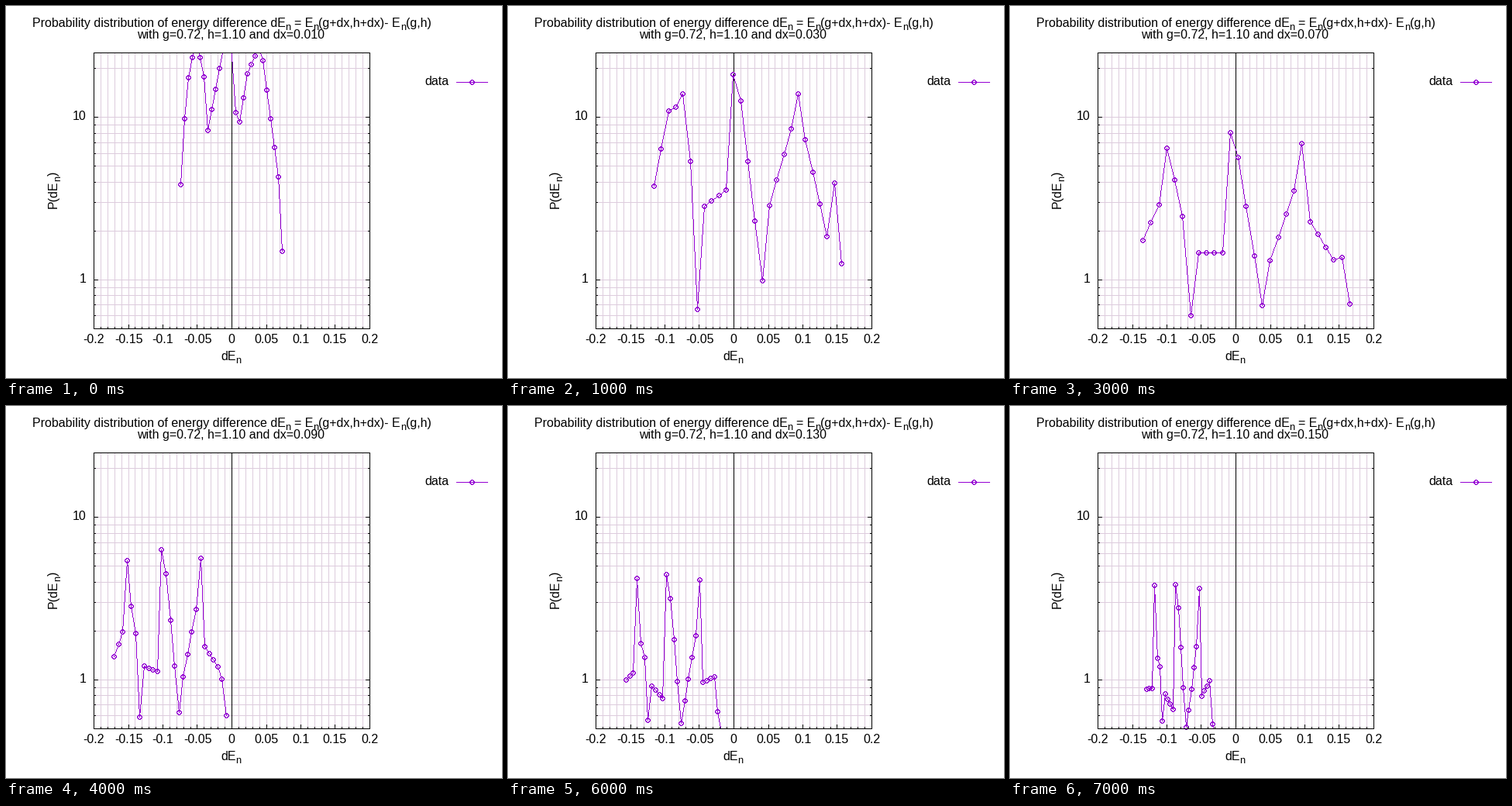
Animation of 640 by 480 pixels, one loop 8000 ms. Source, as a matplotlib script:

```python
import numpy as np
import matplotlib.pyplot as plt
from matplotlib.animation import FuncAnimation
from matplotlib.collections import PolyCollection

W, H, DPI = 640, 480, 100
PX = 72 / DPI                        # one pixel in points
L, R, T, B = 113, 469, 60, 416       # plot box
PURPLE, GRID = "#9400d3", "#ddccdd"
DECADE = (B - T) / np.log10(50)
STEPS, BINS = 8, np.arange(27)

# First and last bin of each step, in pixels
SPANS = [(225, 356), (188, 430), (165, 395), (171, 438),
         (139, 284), (102, 286), (152, 275), (176, 264)]

# Key points of the narrow opening curve: bin, pixel row
OPENING = [(0, 230), (1, 145), (2, 92), (4, 40), (6, 91), (7, 160), (10, 80),
           (12, 30), (13, 50), (14, 137), (15, 149), (17, 87), (20, 52),
           (21, 70), (25, 220), (26, 316)]

# Key points of the three-peaked curve: bin, row at dx=0.05, row at dx=0.15
PEAKS = [(0, 274, 365), (2, 208, 364), (3, 162, 231), (4, 180, 325),
         (5, 243, 336), (6, 396, 406), (7, 294, 371), (10, 286, 391),
         (11, 133, 230), (12, 166, 260), (15, 373, 414), (16, 300, 392),
         (19, 206, 310), (20, 152, 235), (21, 236, 374), (24, 315, 354),
         (25, 286, 410), (26, 363, 430)]

plt.rcParams["font.family"] = "Liberation Sans"

fig = plt.figure(figsize=(W / DPI, H / DPI), dpi=DPI, facecolor="white")
ax = fig.add_axes([0, 0, 1, 1])
ax.set_xlim(-0.1, W - 0.1)           # keeps snapped lines on whole pixels
ax.set_ylim(H - 0.1, -0.1)
ax.axis("off")


def px(v):
    return round(L + (v + 0.2) / 0.4 * (R - L))


def py(p):
    return round(B - DECADE * np.log10(p / 0.5))


def line(xs, ys, color="black", z=1, **kw):
    ax.plot(xs, ys, color=color, lw=PX, antialiased=False, zorder=z, **kw)


def text(x, y, s, size=16, **kw):
    return ax.text(x, y, s, fontsize=size * PX, va="baseline",
                   color="black", zorder=6, **kw)


def sub(x, y, **kw):
    text(x, y, "n", 12.8, **kw)


def pixel_layer():
    layer = PolyCollection([], facecolor=PURPLE, edgecolor="none",
                           linewidth=0, antialiased=False, zorder=3)
    layer.set_snap(False)
    return ax.add_collection(layer, autolim=False)


def squares(pts):
    corners = np.array([(0, 0), (1, 0), (1, 1), (0, 1)]) * 0.96 - 0.08
    return np.unique(pts, axis=0)[:, None, :] + corners


def trace(x, y):
    """Hard-edged one-pixel path through the points."""
    parts = []
    for x0, y0, x1, y1 in zip(x, y, x[1:], y[1:]):
        n = int(max(abs(x1 - x0), abs(y1 - y0))) + 1
        parts.append(np.column_stack([np.linspace(x0, x1, n),
                                      np.linspace(y0, y1, n)]))
    return np.round(np.vstack(parts))


def rings(x, y):
    a = np.linspace(0, 2 * np.pi, 72, endpoint=False)
    ring = np.round(2.7 * np.column_stack([np.cos(a), np.sin(a)]))
    return (np.column_stack([x, y])[:, None, :] + ring).reshape(-1, 2)


def inside(pts):
    x, y = pts[:, 0], pts[:, 1]
    return (x >= L) & (x <= R) & (y >= T) & (y <= B)


def rows(i, dx):
    if i == 0:
        k, r = np.transpose(OPENING)
    else:
        k, start, end = np.transpose(PEAKS)
        r = start + (end - start) * np.log(dx / 0.05) / np.log(3)
    return np.interp(BINS, k, r)


# Grid and ticks
for i in range(41):
    x = px(-0.2 + i * 0.01)
    if 0 < i < 40:
        line([x, x], [T, B], GRID)
    line([x, x], [B, B - (2 if i % 5 else 5)], z=5)

for p in [k / 10 for k in range(6, 10)] + list(range(1, 10)) + [10, 20]:
    y = py(p)
    size = 5 if p in (1, 10) else 2
    line([L, R], [y, y], GRID)
    line([L, L + size], [y, y], z=5)
    line([R, R - size], [y, y], z=5)

line([px(0)] * 2, [T, B], z=2)
line([L, R, R, L, L], [T, T, B, B, T], z=5, solid_joinstyle="miter")

# Axis labels
for i in range(9):
    v = round(-0.2 + 0.05 * i, 2)
    text(px(v), 435, f"{v:g}" if v else "0", ha="center")
text(103.5, 147, "10", ha="right")
text(103.5, 357, "1", ha="right")

text(277, 457, "dE")
sub(296.5, 461)

up = dict(rotation=90, rotation_mode="anchor")
text(66, 261, "P(dE", **up)
sub(70, 225.5, **up)
text(66, 218.5, ")", **up)

# Title
text(33.4, 27, "Probability distribution of energy difference dE")
sub(359.9, 31)
text(371.4, 27, "= E")
sub(395.9, 31)
text(403, 27, "(g+dx,h+dx)- E")
sub(508.8, 31)
text(515.9, 27, "(g,h)")
subtitle = text(290, 42, "", ha="center")

# Legend
text(571.5, 102, "data", ha="right")
key = np.vstack([trace([581, 621], [98, 98]), rings([601], [98])])
pixel_layer().set_verts(squares(key))

curve = pixel_layer()


def draw(i):
    dx = 0.01 + 0.02 * i
    x = np.round(np.linspace(*SPANS[i], len(BINS)))
    y = np.round(rows(i, dx))
    pts = np.column_stack([x, y])
    path, seen = trace(x, y), pts[inside(pts)]
    curve.set_verts(squares(np.vstack([path[inside(path)], rings(*seen.T)])))
    subtitle.set_text(f"with g=0.72, h=1.10 and dx={dx:.3f}")
    return curve, subtitle


anim = FuncAnimation(fig, draw, frames=STEPS, interval=1000,
                     repeat=True, blit=False)
plt.show()
```
